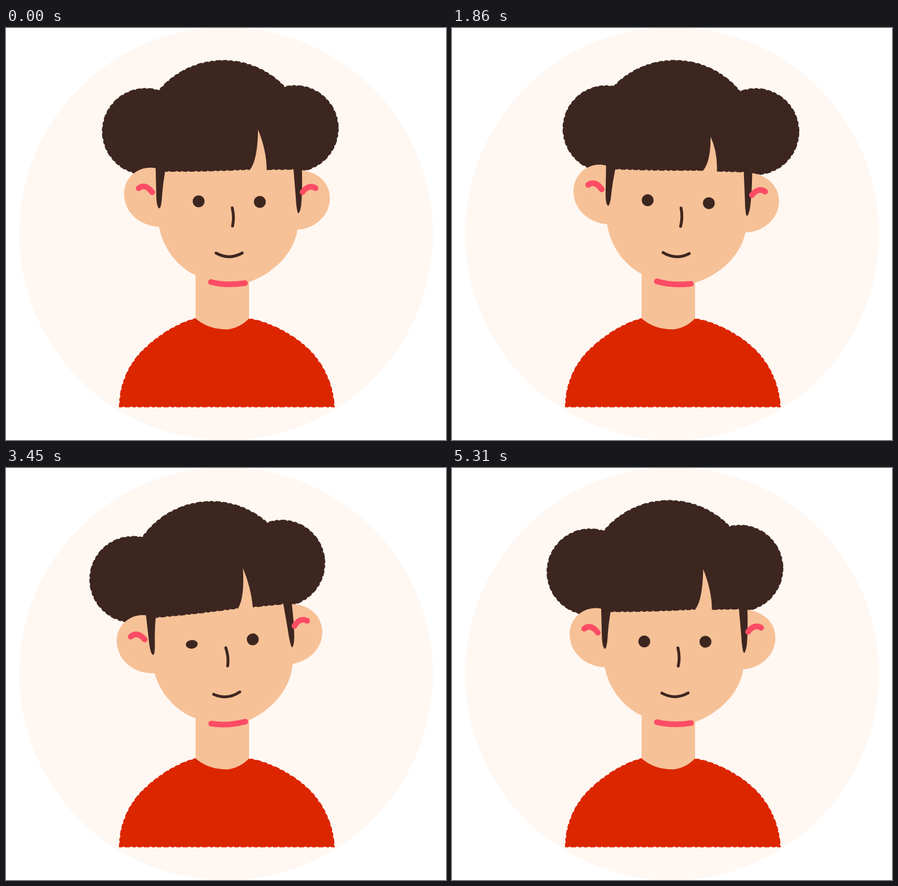
Write an HTML page that moves like this. It is 773x725 px and loops after 5340 ms.

```html
<!DOCTYPE html>
<html lang="en">
<head>
<meta charset="utf-8">
<title>Swaying head</title>
<style>
  html, body { margin: 0; width: 100%; height: 100%; overflow: hidden; background: #fff; }
  svg { display: block; width: 773px; height: 725px; }
  .hair { fill: #3d2620; }
  .skin { fill: #f6c197; }
  .rough { stroke-width: 2; stroke-linecap: round; stroke-dasharray: 6 5 4 6 8 5; }
  .hair.rough { stroke: #3d2620; }
  .line { fill: none; stroke: #3d2620; stroke-width: 5; stroke-linecap: round; }
  .pink { fill: none; stroke: #fc4c64; stroke-width: 10; stroke-linecap: round; stroke-linejoin: round; }
</style>
</head>
<body>
<svg viewBox="0 0 773 725">
  <circle cx="386.5" cy="362" r="363.5" fill="#fff7f2"/>
  <path class="rough" fill="#dc2600" stroke="#dc2600"
    d="M199.500 666.500C199.500 630 214 592 244 564C273 537 304 519 333 511.500H427C460 517 504 538 533 567C559 593 575 630 576.500 666.500Z"/>
  <path class="skin" d="M333 425V511Q354 530 388 530.500Q411 528 427 511V435Z"/>
  <g id="head">
    <g id="buns" class="hair rough">
      <circle cx="245" cy="182" r="75.500"/>
      <circle cx="508" cy="177" r="75.500"/>
    </g>
    <path class="skin" d="M264 247C235 240 207 262 207.500 292C208 325 235 348 269 350C275 385 300 420 333 435L350 446L427 447C470 432 506 396 512 355C545 353 569 328 569 300C569 270 545 253 519 250V235H264Z"/>
    <path class="hair rough" d="M264 247L250 150L259 123A148 148 0 0 1 505 123L520 150L519 249.500L505 248.500L458 249L430 248.500Q350 252.500 280 252Z"/>
    <path id="parting" class="skin"/>
    <path class="hair" d="M263 245L280 250Q276 272 274.500 292Q273 318 269 317.500Q264 314 264 290Z"/>
    <path class="hair" d="M505 247L520 249Q521 290 518.500 313Q516 327 513 326Q510 318 509 296Z"/>
    <path class="pink" d="M233 282C240 276 249 278 257 289M521 289C528 279 537 277 544 282"/>
    <ellipse id="winkEye" class="hair" cx="338.500" cy="305" rx="10.500" ry="10.500"/>
    <circle class="hair" cx="446" cy="306" r="10.500"/>
    <path class="line" d="M397.500 316.500Q401.500 333 398 348.500"/>
    <path class="line" d="M369 396Q392 409 415 396"/>
    <path class="pink" d="M360 447Q386 454 420 449"/>
  </g>
</svg>
<script>
  const LOOP = 5340, SWAY = 1365;
  const $ = id => document.getElementById(id);
  const head = $('head'), buns = $('buns'), parting = $('parting'), winkEye = $('winkEye');

  // time, head angle, extra sideways swing of the buns
  const POSES = [
    [-60, -0.3, -1],
    [355, 4.9, 21],
    [770, -5.5, 0],
    [1120, -0.3, -1],
    [1305, -0.3, -1]
  ];

  const clamp = v => Math.max(0, Math.min(1, v));
  const ease = u => (1 - Math.cos(Math.PI * u)) / 2;
  const mix = (a, b, u) => a + (b - a) * u;

  function poseAt(t) {
    const i = Math.max(1, POSES.findIndex(p => t <= p[0]));
    const a = POSES[i - 1], b = POSES[i];
    const u = ease((t - a[0]) / (b[0] - a[0]));
    return [mix(a[1], b[1], u), mix(a[2], b[2], u)];
  }

  function draw(time) {
    let t = time % LOOP % SWAY;
    if (t > 1305) t -= SWAY;
    const [angle, swing] = poseAt(t);
    head.setAttribute('transform', `rotate(${angle} 391 443)`);
    buns.setAttribute('transform', `translate(${swing} 0)`);

    const lean = Math.max(0, -angle) / 5.3;
    const tipX = 443 + 0.1 * swing - 3 * lean, tipY = 179 + 0.65 * swing;
    const left = 429 + 0.3 * swing - 4 * lean, right = 458 - 7 * lean;
    parting.setAttribute('d',
      `M${tipX} ${tipY}Q${left + 13} 232 ${left} 249V256H${right}V249Q${right} 216 ${tipX} ${tipY}Z`);

    const closed = t < 810 ? clamp((t - 680) / 130) : clamp((930 - t) / 120);
    winkEye.setAttribute('ry', mix(10.5, 1.5, closed));
  }

  const start = performance.now();
  function tick() {
    draw(performance.now() - start);
    requestAnimationFrame(tick);
  }
  draw(0);
  requestAnimationFrame(tick);
</script>
</body>
</html>
```
